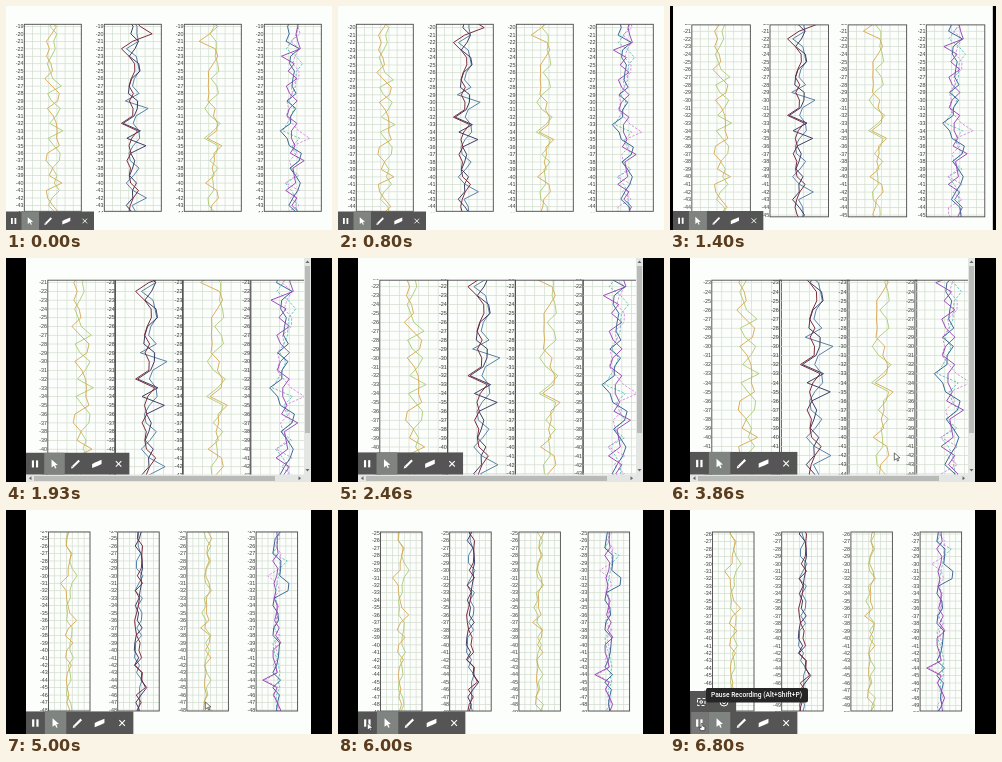
Recreate the animation shown at these times as an HTML page with a canvas. Size 326 px wide and 224 px high, loop 6860 ms.

```html
<!DOCTYPE html>
<html lang="en">
<head>
<meta charset="utf-8">
<title>Scrolling depth charts</title>
<style>
html, body { margin: 0; width: 100%; height: 100%; overflow: hidden; background: #fbfefb; }
canvas { display: block; width: 326px; height: 224px; }
</style>
</head>
<body>
<canvas id="stage" width="326" height="224"></canvas>
<script>
const ctx = document.getElementById('stage').getContext('2d');
const LOOP = 6860, RELOAD = 4600;
const ORANGE = '#d9ab58', GREEN = '#b0cd76', GRID = '#d3dccf';

// The traces wander at random; only the outstanding peaks (row: share of width) are fixed,
// first for the data shown before the reload, then for the data after it.
const traces = [
  {chart: 0, color: GREEN, peaks: [{27: .65, 33: .68}, {30: .69}]},
  {chart: 0, color: ORANGE, peaks: [{26: .36, 40: .66}, {31: .29, 36: .68}]},
  {chart: 1, color: '#527ba3', peaks: [{30: .77, 42: .74}, {30: .61}]},
  {chart: 1, color: '#35335e', peaks: [{32: .33, 35: .73}, {45: .7}]},
  {chart: 1, color: '#782034', peaks: [{20: .84, 22: .3, 32: .3}, {45: .67}]},
  {chart: 2, color: GREEN, peaks: [{30: .36, 34: .35}, {35: .36}]},
  {chart: 2, color: ORANGE, peaks: [{21: .26, 35: .66}, {37: .33}]},
  {chart: 3, color: '#63c2ba', dashed: true, peaks: [{24: .67, 33: .32}, {28: .75}]},
  {chart: 3, color: '#d58ee2', dashed: true, peaks: [{34: .8}, {30: .28, 44: .21}]},
  {chart: 3, color: '#356092', peaks: [{33: .28, 36: .65}, {31: .79, 32: .77}]},
  {chart: 3, color: '#9645b6', peaks: [{23: .3, 37: .7}, {44: .16}]}
];

function noise(n) {
  const v = Math.sin(n * 12.9898) * 43758.5453;
  return v - Math.floor(v);
}

function valueAt(trace, row, reloaded) {
  const spread = reloaded ? .2 : .27;
  const seed = row + 61 * traces.indexOf(trace) + 900 * reloaded;
  return trace.peaks[+reloaded][row] ?? .5 + spread * (noise(seed) - .5);
}

const mix = (a, b, p) => a + (b - a) * p;
const progress = (t, from, to) => Math.min(1, Math.max(0, (t - from) / (to - from)));

// Scrolls about one row a second, with a short stop after the reload
function firstRowAt(t) {
  if (t < 3860) return mix(18.72, 22.73, t / 3860);
  if (t < 5000) return mix(22.73, 24.12, progress(t, 3860, 5000));
  return mix(24.12, 25.8, progress(t, 5330, LOOP));
}

function box(x, y, w, h, color) {
  ctx.fillStyle = color;
  ctx.fillRect(x, y, w, h);
}

function line(points, color, width) {
  ctx.beginPath();
  points.forEach(([x, y]) => ctx.lineTo(x, y));
  ctx.strokeStyle = color;
  ctx.lineWidth = width;
  ctx.stroke();
}

function shape(points, color) {
  ctx.beginPath();
  points.forEach(([x, y]) => ctx.lineTo(x, y));
  ctx.closePath();
  ctx.fillStyle = color;
  ctx.fill();
}

function clipped(x, y, w, h, paint) {
  ctx.save();
  ctx.beginPath();
  ctx.rect(x, y, w, h);
  ctx.clip();
  paint();
  ctx.restore();
}

function chart(index, grid, firstRow, reloaded) {
  const {start, pitch, width, top, row, height} = grid;
  const x = start + index * pitch;
  const rowY = r => top + (r - firstRow) * row;
  const lastRow = Math.ceil(firstRow + height / row);
  clipped(x - 12, top - 1, width + 13, height + 2, () => {
    for (let i = 1; i < 7; i++) box(x + width * i / 7 - .3, top, .7, height, GRID);
    ctx.font = '5.4px "Liberation Sans", Arial, sans-serif';
    ctx.textAlign = 'right';
    ctx.textBaseline = 'middle';
    for (let r = Math.floor(firstRow); r <= lastRow; r++) {
      box(x, rowY(r) - .3, width, .7, GRID);
      ctx.fillStyle = '#3a3a3a';
      ctx.fillText('-' + r, x - .8, rowY(r) + .3);
    }
  });
  clipped(x, top, width, height, () => {
    for (const trace of traces.filter(tr => tr.chart === index)) {
      const points = [];
      for (let r = Math.floor(firstRow) - 1; r <= lastRow + 1; r++) {
        points.push([x + width * valueAt(trace, r, reloaded), rowY(r)]);
      }
      ctx.setLineDash(trace.dashed ? [2.5, 1.5] : []);
      line(points, trace.color, .95);
    }
  });
  ctx.strokeStyle = '#4a4a4a';
  ctx.lineWidth = .9;
  ctx.strokeRect(x, top, width, height);
}

function scrollArrow(x, y, angle) {
  ctx.save();
  ctx.translate(x, y);
  ctx.rotate(angle);
  shape([[-2, 1.3], [0, -1.3], [2, 1.3]], '#666');
  ctx.restore();
}

function scrollbars() {
  box(298, 0, 7, 224, '#e4e6e4');
  box(20, 216.5, 285, 7.5, '#e4e6e4');
  box(299, 8, 5, 167, '#b9bbb9');
  box(28, 218, 241, 5, '#b9bbb9');
  scrollArrow(301.5, 3.8, 0);
  scrollArrow(301.5, 212.2, Math.PI);
  scrollArrow(24.2, 220.2, -Math.PI / 2);
  scrollArrow(293.8, 220.2, Math.PI / 2);
}

const ARROW = [[-3, -4.5], [3.2, 1], [.6, 1.3], [1.9, 4], [.7, 4.5], [-.6, 1.8], [-3, 3.6]];
const HAND = [[-1, -4], [.7, -4], [.7, -1], [3.5, 0], [3, 4], [-1.5, 4], [-3.5, 0], [-1, 1]];

function toolbar(x, bottom, scale, hover) {
  ctx.save();
  ctx.translate(x, bottom - 18.5 * scale);
  ctx.scale(scale, scale);
  box(0, 0, 88, 18.5, '#555');
  box(15.5, 0, 17.5, 18.5, '#808480');
  if (hover) box(1, 0, 14.5, 18.5, '#777');
  box(5, 6.5, 1.8, 6, '#fff');
  box(8.5, 6.5, 1.8, 6, '#fff');
  ctx.translate(24.3, 9.5);
  shape(ARROW.map(([px, py]) => [px * .85, py * .85]), '#fff');
  ctx.translate(18, 0);
  line([[-2.5, 2.5], [3, -3]], '#fff', 1.8);
  shape([[-4, 4], [-3.4, 1.7], [-1.7, 3.4]], '#fff');
  ctx.translate(18, 0);
  shape([[-4, 3.5], [-4, 0], [-1, -1.5], [4, -3.5], [4, 0], [1, 1.5]], '#fff');
  ctx.translate(18.5, 0);
  line([[-2.3, -2.3], [2.3, 2.3]], '#fff', .9);
  line([[2.3, -2.3], [-2.3, 2.3]], '#fff', .9);
  ctx.restore();
}

function ring(x, y, radius) {
  ctx.beginPath();
  ctx.arc(x, y, radius, 0, 2 * Math.PI);
  ctx.stroke();
}

function tooltip() {
  box(20, 181, 46, 21, '#555');
  ctx.strokeStyle = '#fff';
  ctx.lineWidth = 1;
  ctx.setLineDash([3, 2]);
  ctx.strokeRect(27.5, 188.5, 7.5, 7);
  ctx.setLineDash([]);
  ring(31.2, 192, 1.3);
  ring(54, 192, 1.6);
  ring(54, 192, 4);
  ctx.fillStyle = '#262626';
  ctx.beginPath();
  ctx.roundRect(36, 178, 102, 14.5, 2);
  ctx.fill();
  ctx.font = '500 6.7px Roboto, Arial, sans-serif';
  ctx.textAlign = 'center';
  ctx.textBaseline = 'middle';
  ctx.fillStyle = '#fff';
  ctx.fillText('Pause Recording (Alt+Shift+P)', 86.5, 185.5);
}

function pointer(t, hand) {
  const drift = progress(t, 4400, 4900), toButton = progress(t, 5330, 6000);
  const x = mix(mix(227, 202, drift), 32, toButton);
  const y = mix(mix(199, 196, drift), 217, toButton);
  const points = (hand ? HAND : ARROW).map(([px, py]) => [x + px * .9, y + py * .9]);
  shape(points, '#fff');
  line([...points, points[0]], '#333', .7);
}

function layout(narrowing, scale, reloaded) {
  if (reloaded) return {start: 42.5, pitch: 69.2, top: 22, width: 41.5, row: 7.45, height: 179};
  return {
    start: mix(18.3, 41.8, narrowing),
    pitch: mix(80, 67.7, narrowing),
    top: mix(18.3, 22.2, narrowing),
    width: 57 * scale,
    row: 7.46 * scale,
    height: 187 * scale
  };
}

function draw(t) {
  const reloaded = t >= RELOAD, hover = t >= 6130;
  const barred = t >= 1600 && !reloaded;
  const narrowing = progress(t, 1330, 1800);
  const scale = 1 + .175 * narrowing + .045 * progress(t, 1930, 3200);
  const left = 20 * narrowing, right = 326 - 21 * narrowing;
  const grid = layout(narrowing, scale, reloaded);

  ctx.setLineDash([]);
  box(0, 0, 326, 224, '#000');
  box(left, 0, right - left, 224, '#fbfefb');
  clipped(left, 0, right - left, 224, () => {
    for (let i = 0; i < 4; i++) chart(i, grid, firstRowAt(t), reloaded);
    if (barred) scrollbars();
  });
  toolbar(left, barred ? 216.5 : 224, scale, hover);
  if (t >= 6400) tooltip();
  if (t >= 3700) pointer(t, hover);
}

function frame() {
  draw(performance.now() % LOOP);
  requestAnimationFrame(frame);
}
frame();
</script>
</body>
</html>
```
